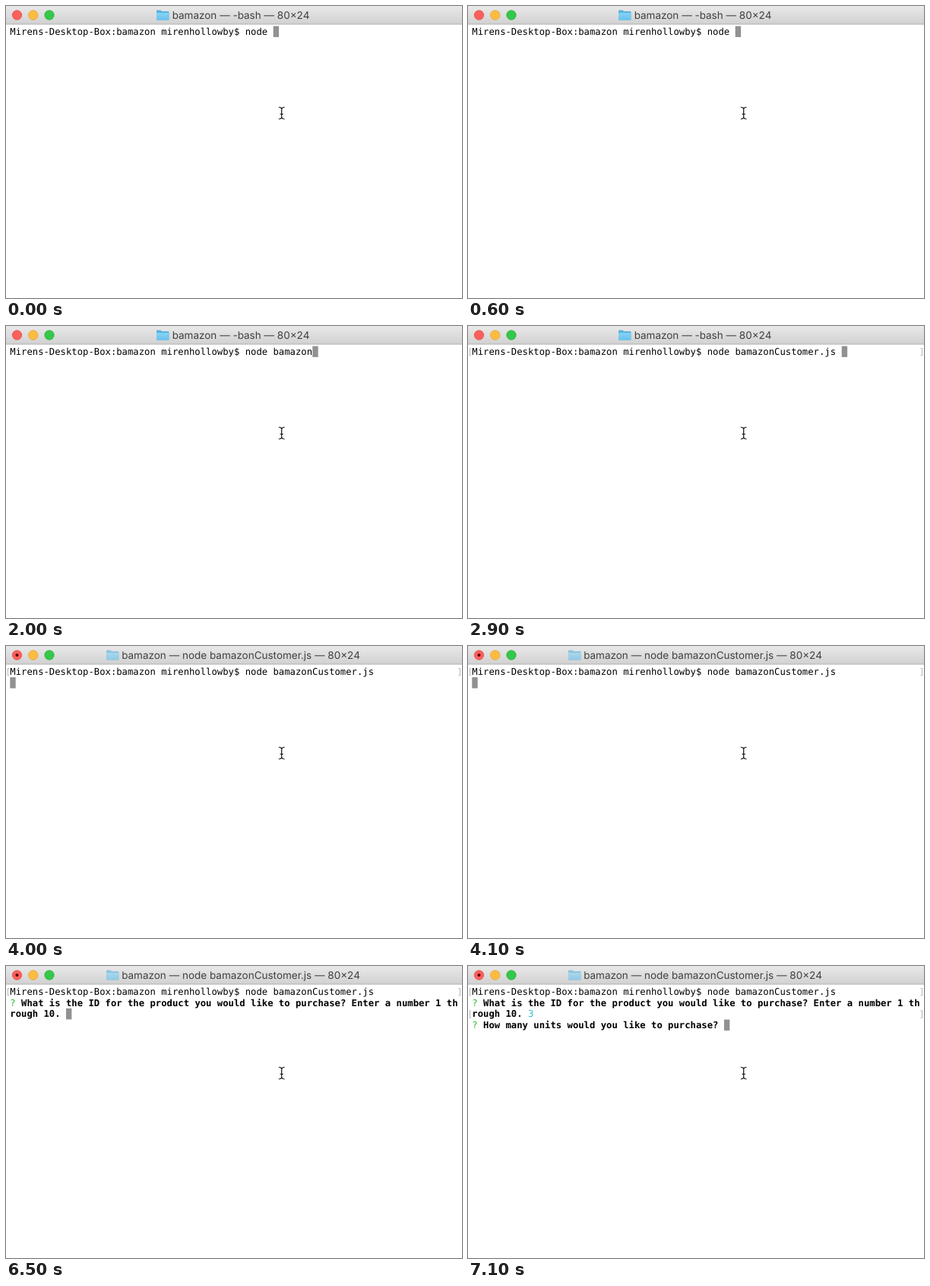
An HTML page for the animation above (8 s loop, 600 by 385 pixels).

```html
<!DOCTYPE html>
<html lang="en">
<head>
<meta charset="utf-8">
<title>Terminal session</title>
<style>
  html, body { margin: 0; width: 100%; height: 100%; overflow: hidden; background: #fff; }
  svg { display: block; width: 600px; height: 385px; text-rendering: geometricPrecision; }
  .row { font: 12.24px "DejaVu Sans Mono", Menlo, monospace; fill: #000; }
  .bold { font-weight: 700; }
  .mark { fill: #2fbb2f; font-weight: 400; }
  .title { font: 13.5px Inter, Roboto, sans-serif; fill: #404040; text-anchor: middle; }
  .bracket { fill: none; stroke: #b4b4b4; stroke-width: 1; }
</style>
</head>
<body>
<svg viewBox="0 0 600 385">
  <defs>
    <linearGradient id="bar" x2="0" y2="1">
      <stop offset="0" stop-color="#e9e9e9"/>
      <stop offset="1" stop-color="#d1d1d1"/>
    </linearGradient>
    <linearGradient id="paper" x2="0" y2="1">
      <stop offset="0" stop-color="#86d3f6"/>
      <stop offset="1" stop-color="#69c1ec"/>
    </linearGradient>
    <path id="brackets" class="bracket" d="M4 29.5H2.5V39H4M595.5 29.5H597.5V39H595.5"/>
  </defs>

  <rect width="600" height="385" fill="#fff"/>
  <rect width="600" height="24" fill="url(#bar)"/>
  <rect y="23.5" width="600" height="1" fill="#b1b1b1"/>
  <g stroke-width=".7">
    <circle cx="14.5" cy="12" r="6.2" fill="#fc605c" stroke="#e0443f"/>
    <circle cx="35.8" cy="12" r="6.2" fill="#fdbc40" stroke="#dfa033"/>
    <circle cx="57" cy="12" r="6.2" fill="#34c84a" stroke="#26a934"/>
  </g>
  <circle id="busy" cx="14.5" cy="12" r="2.1" fill="#5a0a08"/>

  <g id="folder">
    <path d="M0 1.5Q0 .5 1 .5H5.5L7 2H15.5Q16.5 2 16.5 3V12.5Q16.5 13.5 15.5 13.5H1Q0 13.5 0 12.5Z" fill="#58b3df"/>
    <path d="M0 4H16.5V12.5Q16.5 13.5 15.5 13.5H1Q0 13.5 0 12.5Z" fill="url(#paper)"/>
  </g>
  <text id="title" class="title" x="309" y="17"></text>

  <rect id="cursor" width="7.4" height="14.5" fill="#919191"/>

  <use id="sent" href="#brackets"/>
  <text id="command" class="row" x="5.3" y="38"></text>
  <g id="question1" class="row bold">
    <text x="5.3" y="52.7"><tspan class="mark">?</tspan> What is the ID for the product you would like to purchase? Enter a number 1 th</text>
    <text x="5.3" y="67.4">rough 10.</text>
  </g>
  <text id="answer" class="row" x="79" y="67.4">3</text>
  <g id="question2">
    <use href="#brackets" y="29.4"/>
    <text class="row bold" x="5.3" y="82.1"><tspan class="mark">?</tspan> How many units would you like to purchase?</text>
  </g>

  <g fill="none" stroke-linecap="round" stroke-linejoin="round">
    <path id="beam" d="M359.3 133.5Q362 133.5 362.7 135.5Q363.4 133.5 366.1 133.5M362.7 135.5V147M359.3 149Q362 149 362.7 147Q363.4 149 366.1 149M361 142.5H364.4" stroke="#fff" stroke-width="2.6"/>
    <use href="#beam"/>
    <path d="M359.3 133.5Q362 133.5 362.7 135.5Q363.4 133.5 366.1 133.5M362.7 135.5V147M359.3 149Q362 149 362.7 147Q363.4 149 366.1 149M361 142.5H364.4" stroke="#111" stroke-width="1.2"/>
  </g>
</svg>

<script>
const LOOP = 8000;
const LEFT = 5.3, TOP = 26.5, COL = 7.37, ROW = 14.7;
const PROMPT = "Mirens-Desktop-Box:bamazon mirenhollowby$ node ";
const SCRIPT = "bamazonCustomer.js";

// [time in ms, typed argument]
const typing = [
  [0, ""],
  [100, "cust"], [200, "custome"], [300, "customer.j"],
  [400, "custom"], [500, "cus"], [600, ""],
  [800, "b"], [900, "ba"], [1000, "bam"], [1100, "bama"],
  [1500, "bamaz"], [1600, "bamazo"], [1700, "bamazon"],
  [2700, "bamazonC"], [2900, SCRIPT + " "]
];

// [time in ms, column, row] once the command has been sent
const jumps = [[3900, 0, 1], [4800, 10, 2], [6600, 11, 2], [7100, 45, 3]];

const $ = id => document.getElementById(id);
const show = (id, on) => { $(id).style.display = on ? "" : "none"; };
const latest = (steps, t) => steps.filter(step => step[0] <= t).pop();

function render(t) {
  const line = PROMPT + latest(typing, t)[1];
  $("command").textContent = line;

  const [, col, row] = latest(jumps, t) || [0, line.length, 0];
  $("cursor").setAttribute("x", LEFT + col * COL);
  $("cursor").setAttribute("y", TOP + row * ROW);

  const running = t >= 4000;
  $("title").textContent = `bamazon — ${running ? "node " + SCRIPT : "-bash"} — 80×24`;
  $("folder").setAttribute("transform", `translate(${running ? 132 : 198} 5)`);
  $("folder").setAttribute("opacity", running ? 0.62 : 1);
  show("busy", running);

  show("sent", t >= 2900);
  show("question1", t >= 4800);
  show("answer", t >= 6600);
  $("answer").style.fill = t >= 7100 ? "#35b7d0" : "#000";
  show("question2", t >= 7100);
}

const start = performance.now();
function tick() {
  render((performance.now() - start) % LOOP);
  requestAnimationFrame(tick);
}
tick();
</script>
</body>
</html>
```
